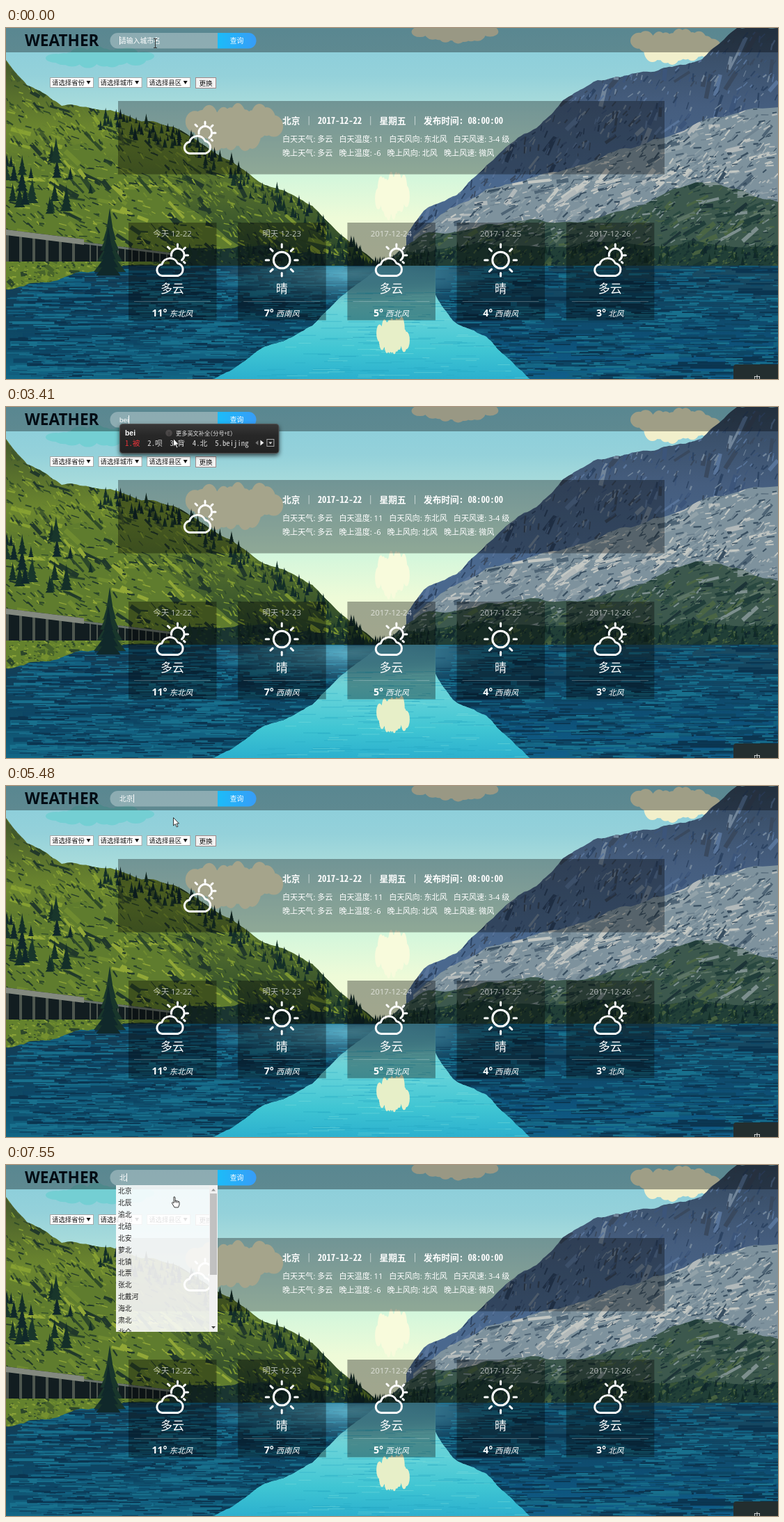
An HTML page with a canvas for the animation above (8 s loop, 1109 px wide and 505 px high).

```html
<!DOCTYPE html>
<html lang="zh-CN">
<head>
<meta charset="utf-8">
<title>Weather</title>
<style>
html, body { margin: 0; width: 100%; height: 100%; overflow: hidden; background: #0f5f86; }
canvas, svg { position: absolute; left: 0; top: 0; }
text { font-family: "Open Sans", "Noto Sans CJK SC", "Noto Sans CJK", sans-serif; white-space: pre; }
.mono { font-family: "Noto Sans Mono CJK SC", "Noto Sans CJK SC", "Noto Sans Mono", monospace; }
.field { font-family: "Liberation Sans", "Noto Sans CJK SC", sans-serif; }
.mid { text-anchor: middle; }
.ink { fill: #111; }
.line { fill: none; stroke: #fff; stroke-width: 3; stroke-linecap: round; stroke-linejoin: round; }
.cursor { fill: #fff; stroke: #222; stroke-width: .9; }
</style>
</head>
<body>
<canvas id="scene" width="1109" height="505"></canvas>
<svg width="1109" height="505">
  <defs>
    <linearGradient id="blue"><stop stop-color="#1cbcf8"/><stop offset="1" stop-color="#389cf8"/></linearGradient>
    <linearGradient id="dark" x2="0" y2="1"><stop stop-color="#383838"/><stop offset=".4" stop-color="#272727"/><stop offset="1" stop-color="#222"/></linearGradient>
    <clipPath id="pill"><rect x="149.5" y="7" width="210" height="22.5" rx="11.2"/></clipPath>
    <clipPath id="listBox"><rect x="158" y="29" width="146" height="211"/></clipPath>
    <g id="cloudy" class="line">
      <path d="M10 47.5A8.3 8.3 0 0 1 9.500 31A12 12 0 0 1 32 29.500A9.200 9.200 0 0 1 32.500 47.500Z"/>
      <path d="M23 19A9.300 9.300 0 1 1 38 25M32 2V5.500M43 7L41 9M47 18H44M42.500 29L41 27.500M18 6L20.500 8.500"/>
    </g>
    <g id="sunny" class="line"><circle cx="24.5" cy="25" r="11.8"/></g>
  </defs>
  <g id="page"></g>
  <g id="live"></g>
</svg>
<script>
const $ = id => document.getElementById(id);
const ctx = $('scene').getContext('2d');
const W = 1109, H = 505, SHORE = 342;
let seed = 11;
const rnd = () => (seed = seed * 16807 % 2147483647) / 2147483647;
const jitter = n => (rnd() - .5) * n;
const pick = a => a[Math.floor(rnd() * a.length)];

function fade(y0, y1, ...colors) {
  const g = ctx.createLinearGradient(0, y0, 0, y1);
  colors.forEach((c, i) => g.addColorStop(i / (colors.length - 1), c));
  return g;
}

// Key points roughened by midpoint displacement
function ridge(keys, rough = .16) {
  let p = keys.split(' ').map(k => k.split(',').map(Number));
  for (let level = 0; level < 4; level++) {
    p = p.flatMap((a, i) => {
      const b = p[i + 1];
      if (!b) return [a];
      return [a, [(a[0] + b[0]) / 2, (a[1] + b[1]) / 2 + jitter((b[0] - a[0]) * rough)]];
    });
  }
  return p;
}

const mirror = (p, dx = 0) => p.map(([x, y]) => [x + dx, 2 * SHORE - y]);

// Area between a line and a base level, covered with broad then fine strokes
function land(line, base, fill, colors = [], count = 0, angle = 0, size = 4) {
  const xs = line.map(q => q[0]), x0 = Math.min(...xs), x1 = Math.max(...xs);
  const ys = line.map(q => q[1]).concat(base), y0 = Math.min(...ys), y1 = Math.min(H, Math.max(...ys));
  ctx.save();
  ctx.beginPath();
  line.forEach(q => ctx.lineTo(...q));
  ctx.lineTo(x1, base);
  ctx.lineTo(x0, base);
  ctx.fillStyle = fill;
  ctx.fill();
  ctx.clip();
  for (const scale of [3, 1]) {
    for (let i = 0; i < count / scale ** 2; i++) {
      const x = x0 + rnd() * (x1 - x0), y = y0 + rnd() * (y1 - y0);
      const len = size * scale * (1 + rnd() * 2), a = angle + (angle ? jitter(1) : 0);
      ctx.strokeStyle = pick(colors);
      ctx.lineWidth = scale * (1 + rnd() * 1.5);
      ctx.beginPath();
      ctx.moveTo(x, y);
      ctx.lineTo(x + len * Math.cos(a), y + len * Math.sin(a));
      ctx.stroke();
    }
  }
  ctx.restore();
}

function tree(x, y, h) {
  ctx.fillStyle = pick(['#10282a', '#142f28', '#19362b']);
  for (let i = 1; i <= 5; i++) {
    const w = h * .05 * i, top = y - h + h * (i - 1) / 6;
    ctx.beginPath();
    ctx.moveTo(x, top);
    ctx.lineTo(x + w, top + h / 3);
    ctx.lineTo(x - w, top + h / 3);
    ctx.fill();
  }
}

// Trees standing on or just below a line
function forest(line, count, depth, size) {
  for (let i = 0; i < count; i++) {
    const [x, y] = pick(line);
    tree(x + jitter(10), y + 4 + rnd() * depth, size * (.6 + rnd()));
  }
}

function cloud(x, y, w, h, color) {
  ctx.fillStyle = color;
  ctx.beginPath();
  for (let i = 0; i < 12; i++) {
    const u = i / 11 * 2 - 1, r = h * (.25 + .25 * (1 - u * u));
    const cx = x + u * w * .42, cy = y + jitter(h * .3);
    ctx.moveTo(cx, cy);
    ctx.ellipse(cx, cy, w * .1, r, 0, 0, 7);
  }
  ctx.fill();
}

function paintSky() {
  ctx.fillStyle = fade(0, SHORE, '#88cddb', '#94d1da', '#b4e2dc', '#d0f6dc', '#eefbd8', '#f4fbd6');
  ctx.fillRect(0, 0, W, SHORE);
  cloud(135, 42, 150, 26, '#74cfd3');
  cloud(645, 4, 120, 30, '#e8e6c8');
  cloud(962, 24, 125, 46, '#f1efcb');
  cloud(328, 140, 135, 62, '#f3f1cc');
  cloud(555, 240, 48, 62, '#f8fbdc');
}

const peaks = ridge('575,300 600,263 648,240 691,197 762,144 800,104 850,75 937,61 1000,45 1050,0 1109,0');
const rocks = ridge('585,300 690,232 800,205 930,160 1109,114');
const slope = ridge('545,335 600,296 720,280 900,258 1020,222 1109,250');
const woods = ridge('535,340 620,318 860,308 1109,312');
const hill = ridge('0,46 30,82 80,112 150,118 240,142 304,182 372,226 440,256 500,312 536,342', .12);
const meadow = ridge('0,190 110,165 230,235 330,310 400,342');
const brush = ridge('90,322 300,318 450,325 545,342');

function paintRight() {
  land(peaks, SHORE, fade(0, 220, '#34485e', '#455d7e', '#4a688e'),
    ['#2d4463', '#58749a', '#3c557a', '#39495f', '#71859a'], 1500, 2.1);
  land(rocks, SHORE, '#7e929d', ['#b2b9ba', '#4e6475', '#92a2a9', '#c3c7c3', '#394f61', '#6f8390'], 1900, 2.65);
  land(slope, SHORE, '#3c584d', ['#213e3a', '#5c7465', '#4a6544', '#294840', '#7d8f8e', '#1d3437'], 1100, 2.7);
  land(woods, SHORE, '#213f37', ['#122b2f', '#385438', '#183432', '#46603f'], 500, 2.5, 2);
  forest(woods, 140, 22, 9);
}

function paintLeft() {
  land(hill, SHORE, fade(50, SHORE, '#45592b', '#6c872f', '#4c672d', '#223f2b'),
    ['#86a032', '#2f4a28', '#64802e', '#22392a', '#7b9531', '#40592c'], 2000, .7);
  land(meadow, SHORE, '#5f7c2e', ['#91a737', '#2c472a', '#6f8b30', '#20382a'], 700, .5);
  land(brush, SHORE, '#1a3531', ['#112627', '#3f592c', '#254330'], 300, .3, 2);
  forest(hill.slice(45), 150, 30, 11);
  forest(meadow.slice(0, 18), 22, 90, 24);
  forest(brush, 100, 14, 12);
}

function paintWater() {
  const deep = ['#0b3550', '#126080', '#18708d', '#0d4665'];
  ctx.fillStyle = fade(SHORE, H, '#4f9fb5', '#7ad6d7', '#5dd0d8', '#3fc5d3', '#2bb0ce');
  ctx.fillRect(0, SHORE, W, H);
  land(mirror(hill), SHORE, fade(SHORE, H, '#173f56', '#103f59', '#0e4b68', '#126786'), deep, 1500, 0, 12);
  land(mirror(peaks, 42), SHORE, fade(SHORE, H, '#1b4b61', '#114663', '#0d5077', '#105f8b'), deep, 1200, 0, 12);

  // Sky glow along the far shore
  const glow = ctx.createRadialGradient(0, 0, 0, 0, 0, 1);
  glow.addColorStop(0, '#62b6cdee');
  glow.addColorStop(1, '#3b86a500');
  ctx.save();
  ctx.translate(500, 354);
  ctx.scale(230, 45);
  ctx.fillStyle = glow;
  ctx.fillRect(-1, -.25, 2, 1.25);
  ctx.restore();

  for (let i = 0; i < 170; i++) {
    const y = 380 + rnd() * 125;
    ctx.fillStyle = pick(['#84e1dc66', '#1c9dbb66', '#2aabc588']);
    ctx.fillRect(545 + jitter(120 + (y - 380) * 2.2), y, 10 + rnd() * 35, 1);
  }
  cloud(556, 443, 46, 50, '#e7efc8');
  land(ridge('0,376 50,366 100,352 235,340'), 330, '#64822d', ['#2c462a', '#8ba338', '#48642b', '#75902f'], 260, .3, 2);
}

function paintGallery() {
  const roof = x => 290 + x * .125;
  for (let x = 0; x < 236; x++) {
    const near = x < 112, y = roof(x) + (near ? 0 : 4), pillar = x % (near ? 19 : 10) < (near ? 4 : 2);
    ctx.fillStyle = pillar ? '#4e574f' : '#121d20';
    ctx.fillRect(x, y, 1, 336 - y);
    ctx.fillStyle = near ? '#83897f' : '#68736b';
    ctx.fillRect(x, y, 1, near ? 8 : 3);
  }
  tree(149, 351, 92);
  tree(147, 356, 70);
}

[paintSky, paintRight, paintLeft, paintWater, paintGallery].forEach(f => f());

const text = (x, y, size, s, attr = '') =>
  `<text x="${x}" y="${y}" font-size="${size}" fill="#fff" ${attr}>${s}</text>`;
const rect = (x, y, w, h, fill, attr = '') =>
  `<rect x="${x}" y="${y}" width="${w}" height="${h}" fill="${fill}" ${attr}/>`;
const shade = (x, y, w, h, alpha) => rect(x, y, w, h, '#000', `fill-opacity="${alpha}"`);
const spaced = parts => parts.map(s => `<tspan dx="9">${s}</tspan>`).join('');

for (let i = 0; i < 8; i++) {
  $('sunny').innerHTML += `<path d="M43 25h4.500" transform="rotate(${i * 45} 24.5 25)"/>`;
}

function card([date, sky, deg, wind], i) {
  const x = 176 + i * 157.2, c = x + 63;
  return shade(x, 280, 126.5, 140.5, .34) +
    text(c, 300, 11.4, date, 'class="mid" fill-opacity=".65"') +
    `<use href="#${sky === '晴' ? 'sunny' : 'cloudy'}" x="${c - 24.5}" y="309"/>` +
    text(c, 381, 17, sky, 'class="mid"') +
    rect(x + 8, 393, 110, 1, '#fff', 'fill-opacity=".25"') +
    text(c, 415, 11.3, `<tspan font-size="14" font-weight="bold">${deg}°</tspan> <tspan font-style="italic">${wind}</tspan>`, 'class="mid"');
}

function select(name, i) {
  const x = 63 + i * 69.6;
  return rect(x + .5, 71.5, 62, 14, '#fff', 'stroke="#a5a9a9"') +
    text(x + 3, 82, 9.4, '请选择' + name, 'class="ink" style="fill:#111"') +
    `<path d="M${x + 52.5} 76h6l-3 5z" class="ink"/>`;
}

$('page').innerHTML =
  shade(0, 0, W, 35, .34) +
  text(27, 26, 22.6, 'WEATHER', 'font-weight="bold" style="fill:#020c14"') +
  `<g clip-path="url(#pill)">${rect(149, 7, 155, 23, '#fff', 'fill-opacity=".3"')}${rect(304, 7, 56, 23, 'url(#blue)')}</g>` +
  text(331.5, 22, 9.8, '查询', 'class="mid" font-weight="500"') +
  ['省份', '城市', '县区'].map(select).join('') +
  rect(272.5, 71.5, 29, 15, '#f2f2f2', 'stroke="#a08a8a"') +
  text(287, 82.5, 9.6, '更换', 'class="mid" style="fill:#111"') +
  shade(161, 105, 785, 105.5, .32) +
  '<use href="#cloudy" x="254" y="133"/>' +
  text(397, 138, 12.7, '北京 ｜ 2017-12-22 ｜ 星期五 ｜ 发布时间: 08:00:00', 'class="mono" font-weight="bold"') +
  text(388, 164, 11.1, spaced(['白天天气: 多云', '白天温度: 11', '白天风向: 东北风', '白天风速: 3-4 级'])) +
  text(388, 184, 11.1, spaced(['晚上天气: 多云', '晚上温度: -6', '晚上风向: 北风', '晚上风速: 微风'])) +
  [['今天 12-22', '多云', 11, '东北风'],
   ['明天 12-23', '晴', 7, '西南风'],
   ['2017-12-24', '多云', 5, '西北风'],
   ['2017-12-25', '晴', 4, '西南风'],
   ['2017-12-26', '多云', 3, '北风']].map(card).join('') +
  rect(1045, 484, 70, 30, '#232e2f', 'rx="4"') +
  text(1079, 508, 10, '中', 'class="mid"');

// Start time, field text, composed letters, candidates, whether the hint shows
const steps = [
  [0, ''],
  [2560, '', 'b', '不 吧 把 被 本'],
  [2710, 'b', 'b', '不 吧 把 被 本'],
  [2860, 'be', 'be', '被 呗 背 北 备'],
  [3010, 'bei', 'bei', '被 呗 背 北 beijing'],
  [3410, 'bei', 'bei', '被 呗 背 北 beijing', true],
  [4630, 'beiji', "bei'ji", '北极 背脊 备机 碑记 beijing'],
  [4770, 'beijin', "bei'jin", '北京 背景 背筋 北进 beijing'],
  [4890, 'beijing', "bei'jing", '北京 背景 北京市 北京人 北京站'],
  [5320, 'beijing', "bei'jing", '北京 背景 北京市 北京人 北京站', true],
  [5480, '北京'],
  [6550, '北'],
  [7550, '北']
];
const BLINK = 535;
const cities = '北京 北辰 渝北 北碚 北安 萝北 北镇 北票 张北 北戴河 海北 肃北 北仑'.split(' ');

function measure(s, font) {
  ctx.font = font + ' "Liberation Sans", "Noto Sans CJK SC", sans-serif';
  return ctx.measureText(s).width;
}

function popup(letters, words) {
  const items = words.split(' ').map((w, i) => `${i + 1}.${w}`);
  const ems = [...items.join('  ')].reduce((n, c) => n + (c < '~' ? .5 : 1), 0);
  const right = 215 + ems * 10.75;
  const row = items.map((s, i) => `<tspan fill="${i ? '#ddd' : '#e8343a'}">${s}</tspan>`).join('  ');
  return rect(163.5, 24.5, right - 164, 42, 'url(#dark)', 'rx="4" stroke="#505050" style="filter:drop-shadow(0 3px 3px #000a)"') +
    text(171, 41, 10.4, letters, 'class="field" font-weight="bold"') +
    text(171, 55.5, 10.75, row, 'class="mono"') +
    `<g transform="translate(${right} 0)"><path d="M-30 48v7l-4-3.500z" fill="#777"/><path d="M-27 47.500v8l5-4z" fill="#eee"/>` +
    rect(-17.5, 46.5, 10, 10, 'none', 'stroke="#aaa"') + '<path d="M-15 50.500h5l-2.500 3z" fill="#ddd"/></g>';
}

function hint(letters, age) {
  const x = 214 + measure(letters, 'bold 10.4px');
  const glow = Math.min(.85, .25 + .15 * Math.floor(age / 130));
  return `<g opacity="${glow}"><circle cx="${x + 5}" cy="37.500" r="4.800" fill="#a89c9c"/>` +
    text(x + 5, 40.5, 8, '!', 'class="mid" style="fill:#222"') + '</g>' +
    text(x + 15, 40.5, 8.2, '更多英文补全(分号+E)', 'class="mono" style="fill:#ddd"');
}

function list(all) {
  const rows = all ? cities : cities.slice(0, 1);
  return '<g clip-path="url(#listBox)">' +
    rect(158, 29, 146, all ? 211 : 17, '#fff', 'fill-opacity=".88"') +
    rows.map((s, i) => text(161, 41.3 + i * 16.87, 9.8, s, 'style="fill:#222"')).join('') +
    (all ? rect(292, 29, 12, 211, '#f1f1f1') + rect(293, 41, 10, 117, '#c1c1c1') +
      '<path d="M295 37.500h6l-3-3.500z" fill="#999"/><path d="M295 232h6l-3 3.500z" fill="#444"/>' : '') + '</g>';
}

function cursor(t) {
  if (t < 150) return '<path d="M212 15.500h5M214.500 16v12M212 28.500h5" stroke="#333"/>';
  if (t < 5600) return '<path class="cursor" d="M240.500 45.500v11.500l2.700-2.400 2 4.400 1.800-.8-2-4.200h3.500z"/>';
  return '<path class="cursor" d="M241 46q1.500-1 2 1v4.500q1.500-1 2 .3 1.500-.8 2 .5 2-.5 2 1.700v3l-1.500 4h-5.500l-3-5q-1.500-2 .2-2.500l1.800 1.500z' +
    'M243 51v3M245 52v2.500M247 52.500v2"/>';
}

function draw(t) {
  const [start, typed, letters, words, hinted] = steps.filter(s => s[0] <= t).pop();
  const age = t - start;
  let out = text(163, 22, 9.8, typed || '请输入城市名', 'class="field"');
  if (Math.floor(age / BLINK) % 2 === 0) {
    out += rect(163 + Math.round(measure(typed, '9.8px')), 12, 1, 12, '#fff');
  }
  if (letters) out += popup(letters, words);
  if (hinted) out += hint(letters, age);
  if (t >= 5600) out += list(t >= 6700);
  return out + cursor(t);
}

let shown = '';
function tick() {
  const next = draw(performance.now() % 8000);
  if (next !== shown) $('live').innerHTML = shown = next;
  requestAnimationFrame(tick);
}
tick();
</script>
</body>
</html>
```
